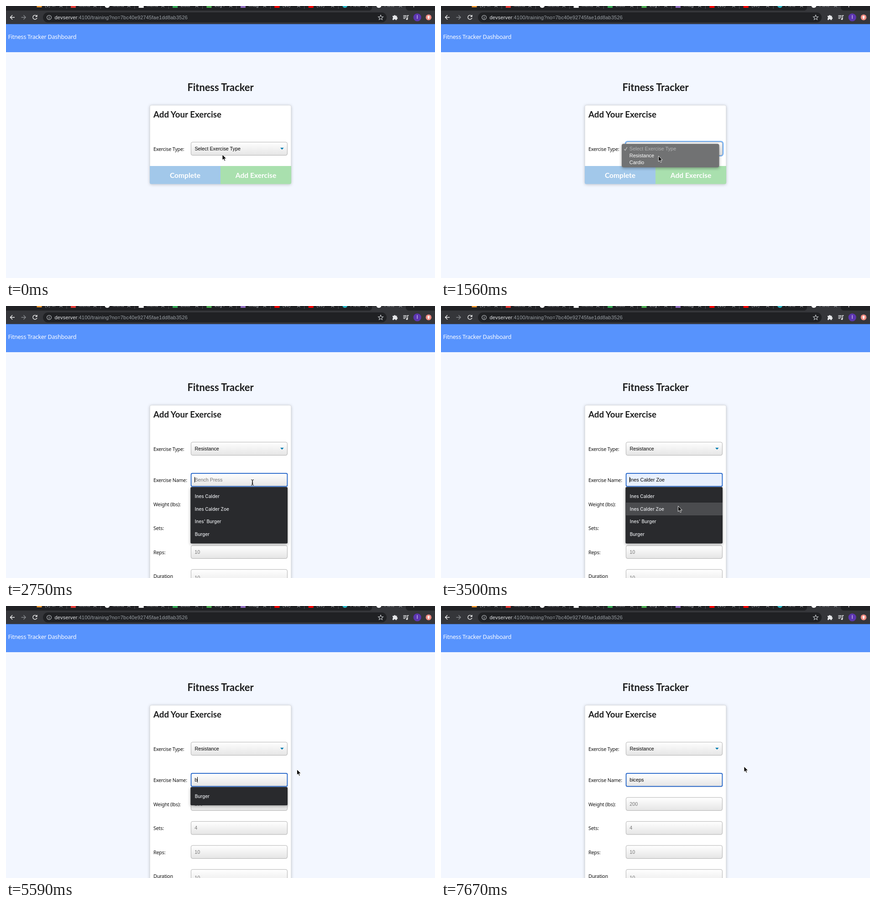
Animation of 940 by 595 pixels, one loop 8000 ms. Source, as an HTML page:

```html
<!DOCTYPE html>
<html lang="en">
<head>
<meta charset="utf-8">
<title>Fitness Tracker</title>
<style>
  html, body { margin: 0; width: 100%; height: 100%; overflow: hidden; background: #f3f7ff; }
  svg { display: block; width: 940px; height: 595px; }
  text { white-space: pre; }
  .head { font-family: Lato, sans-serif; font-weight: 700; fill: #1b1c1d; }
  .label { font: 10.8px "Noto Sans", sans-serif; letter-spacing: -.24px; fill: #111; }
  .field { font: 10.8px "Liberation Sans", Arial, sans-serif; fill: #000; }
  .hint { fill: #757575; }
  .menu { font: 11px "Liberation Sans", Arial, sans-serif; fill: #fff; }
  .option { font: 500 10px Inter, sans-serif; fill: #e8eaed; }
  .tab { font: 10px "Liberation Sans", Arial, sans-serif; fill: #a4a8ad; }
  .url { font: 11px "Liberation Sans", Arial, sans-serif; letter-spacing: .17px; fill: #9aa0a6; }
  .line { fill: none; stroke-width: 1.4; }
  .soft { filter: drop-shadow(0 1px 3px rgba(0, 0, 0, .2)); }
  .deep { filter: drop-shadow(0 2px 3px rgba(0, 0, 0, .35)); }
</style>
</head>
<body>
<svg id="stage" viewBox="0 0 940 595">
  <defs>
    <linearGradient id="sheen" x2="0" y2="1">
      <stop stop-color="#fff"/><stop offset="1" stop-color="#e5e5e5"/>
    </linearGradient>
  </defs>
  <rect width="940" height="595" fill="#f3f7ff"/>
  <g id="browser"></g>
  <rect y="39.5" width="940" height="61.5" fill="#5793fd"/>
  <text x="4.5" y="72" fill="#fff" style="font:12.6px 'Noto Sans',sans-serif;letter-spacing:-.27px">Fitness Tracker Dashboard</text>
  <text class="head" x="470" y="185.5" font-size="21.84" text-anchor="middle">Fitness Tracker</text>

  <rect id="card" class="soft" x="315.2" y="217" width="309.6" height="172.5" rx="3.5" fill="#fff" stroke="#d0d3d8" stroke-width=".8"/>
  <text class="head" x="323" y="243.5" font-size="18.72">Add Your Exercise</text>

  <g id="buttons">
    <path d="M315 350h155v39.5H318.5a3.5 3.5 0 0 1-3.5-3.5z" fill="#a2c8ea"/>
    <path d="M470 350h155v36a3.5 3.5 0 0 1-3.5 3.5H470z" fill="#a9e0ae"/>
    <text class="head" x="392.5" y="376.3" font-size="15.6" text-anchor="middle" style="fill:#fff">Complete</text>
    <text class="head" x="547.5" y="376.3" font-size="15.6" text-anchor="middle" style="fill:#fff">Add Exercise</text>
  </g>
  <g id="form"></g>

  <text class="label" x="323" y="317">Exercise Type:</text>
  <rect id="ring" x="404" y="296.3" width="214" height="31.4" rx="5" fill="none" stroke="#76b3f8" stroke-width="2.6"/>
  <rect x="405.4" y="297.8" width="211" height="28.8" rx="3.5" fill="url(#sheen)" stroke="#aaa" stroke-width=".9"/>
  <text id="choice" class="field" x="413.4" y="316.2"></text>
  <path d="M601 310h7.6l-3.8 4.2z" fill="#007cb2"/>

  <g id="popup">
    <rect class="deep" x="396" y="301.5" width="213.5" height="51.5" rx="4" fill="#717273"/>
    <rect id="pick" x="396" y="319.7" width="213.5" height="15.2" fill="#3c95fd"/>
    <path class="line" d="M401.5 313l2.2 2.8 4-7" stroke="#bbb" stroke-width="1"/>
    <text class="menu" x="412.8" y="316.2" style="fill:#b4b5b6">Select Exercise Type</text>
    <text class="menu" x="412.8" y="331">Resistance</text>
    <text class="menu" x="412.8" y="345.7">Cardio</text>
  </g>

  <g id="list">
    <rect id="panel" class="deep" x="404.3" y="396" width="212.7" height="123.5" rx="2.5" fill="#292a2d"/>
    <rect id="hover" x="404.3" width="212.7" height="28" fill="#4b4c4f"/>
    <g id="options"></g>
  </g>

  <path id="arrow" d="M0 0v12.2l2.8-2.6 2 4.5 2-.9-2-4.3h3.9z" fill="#000" stroke="#fff" stroke-width=".9"/>
  <path id="beam" class="line" d="M-3-6q3 0 3 1.5V4.5q0 1.5-3 1.5M3-6q-3 0-3 1.5V4.5q0 1.5 3 1.5M-1.5 2h3" stroke="#000" style="stroke-width:1"/>
</svg>
<script>
const LOOP = 8000;
const $ = id => document.getElementById(id);
const show = (id, on) => $(id).style.display = on ? '' : 'none';
const label = (cls, x, y, text, extra = '') => `<text class="${cls}" x="${x}" y="${y}" ${extra}>${text}</text>`;

function browser() {
  const colors = ['#e8952f', '#e53935', '#fff', '#fff', '#34a853', '#4caf50', '#8e6bbf', '#f00', '#f00', '#26b5c4', '#fff'];
  const titles = ['(1) M', 'Menu', 'Menu', 'menu', 'Lists', 'Log i', 'Imag', '(10)', '(10)', 'Fitne', 'Fitne'];
  let out = '<rect width="940" height="40" fill="#202124"/>' +
    '<path d="M794 10.5q8-1 8-7V0h74v3.5q0 6 8 7z" fill="#35363a"/>' +
    '<rect y="10" width="940" height="29" fill="#35363a"/>' +
    '<rect x="81" y="14" width="753" height="22" rx="11" fill="#202124"/>';
  titles.forEach((title, i) => {
    const x = i * 74.4;
    const round = [2, 9, 10].includes(i);
    out += round
      ? `<circle cx="${x + 73}" cy="-1.5" r="5.6" fill="${colors[i]}"/>`
      : `<rect x="${x + 67.5}" y="-7" width="11" height="${i ? 11 : 10}" fill="${colors[i]}"/>`;
    out += label('tab', x + 85, 2.2, title) +
      `<path class="line" d="M${x + 117.5} 2.5l6-6m0 6l-6-6" stroke="#a4a8ad" style="stroke-width:1.1"/>`;
    if (i < 9) out += `<path d="M${x + 133} 0v6" stroke="#55585d"/>`;
  });
  return out + `
    <path d="M893.5 0v3" stroke="#ccc" stroke-width="1.4"/>
    <path class="line" d="M19 24.7H9.5m4.6-4.7l-4.7 4.7 4.7 4.7" stroke="#eee"/>
    <path class="line" d="M33.5 24.7H43m-4.6-4.7l4.7 4.7-4.7 4.7" stroke="#84878b"/>
    <path class="line" d="M67 21.7a4.6 4.6 0 1 0 .9 4.3" stroke="#eee"/>
    <path d="M68.6 19v4.8h-4.8z" fill="#eee"/>
    <circle class="line" cx="94.5" cy="25" r="4.8" stroke="#c4c7cb" style="stroke-width:1.1"/>
    <path d="M94.5 24.2v3.5m0-5.6v1.1" stroke="#c4c7cb" stroke-width="1.2"/>
    <text class="url" x="106.5" y="28.6"><tspan fill="#e8eaed">devserver</tspan>:4100/training?no=7bc40e92745fae1dd8ab3526</text>
    <path class="line" d="M821 19.7l1.5 3.6 3.9.3-3 2.5 1 3.8-3.4-2-3.4 2 1-3.8-3-2.5 3.9-.3z" stroke="#c4c7cb" style="stroke-width:1.1"/>
    <path d="M847 21.5h3a1.8 1.8 0 0 1 3.6 0h3v3.2a1.7 1.7 0 0 1 0 3.4v2.4h-3.3a1.7 1.7 0 0 0-3.4 0H847v-3.2a1.7 1.7 0 0 0 0-3.2z" fill="#e6e7e9"/>
    <path class="line" d="M870.5 21.2h7.5m-7.5 3h7.5m-7.5 3h4.5m4.8 1.5v-8h2.6" stroke="#e6e7e9"/>
    <circle cx="878.5" cy="28.5" r="1.9" fill="#e6e7e9"/>
    <circle cx="901.2" cy="24.8" r="8.6" fill="#5c35b0"/>
    <text x="901.2" y="28.3" fill="#fff" text-anchor="middle" style="font:10px Roboto,sans-serif">I</text>
    <circle cx="926" cy="24.8" r="6.4" fill="#ee8a80"/>
    <path d="M926 20.8l3.4 3.8h-2v3.6h-2.8v-3.6h-2z" fill="#fff"/>`;
}

function form() {
  const rows = [['Exercise Name:', ''], ['Weight (lbs):', '200'], ['Sets:', '4'], ['Reps:', '10'], ['Duration', '10']];
  const out = rows.map(([name, hint], i) => {
    const top = 366 + i * 52.5;
    const tall = i === 4;
    return label('label', 323, top + 19.2, name) +
      `<rect x="405.4" y="${top + .3}" width="211" height="${tall ? 36 : 28.6}" rx="3.5" fill="url(#sheen)" stroke="#aaa" stroke-width=".9"/>` +
      label('field hint', 413.2, top + (tall ? 22 : 18.4), hint);
  }).join('');
  return out +
    '<rect id="focus" x="405.6" y="366.2" width="210.8" height="28.4" rx="2.5" stroke="#1a5fc8" stroke-width="1.7"/>' +
    label('field', 413.2, 384.2, '', 'id="name"') +
    '<rect id="caret" y="374" width="1" height="12" fill="#000"/>';
}

$('browser').innerHTML = browser();
$('form').innerHTML = form();

const people = ['Ines Calder', 'Ines Calder Zoe', "Ines' Burger", 'Burger'];

// Each track is a list of [start ms, value] steps.
const tracks = {
  popup: [[0, false], [170, true], [1710, false]],
  pick: [[0, false], [670, true], [1560, false], [1640, true]],
  choice: [[0, 'Select Exercise Type'], [1710, 'Resistance']],
  form: [[0, false], [1860, true]],
  ring: [[0, false], [170, true], [2600, false]],
  focus: [[0, false], [2600, true]],
  list: [[0, 0], [2750, 4], [5590, 1], [5880, 0]],
  hover: [[0, -1], [3050, 0], [3200, 1], [3650, 0], [3800, -1]],
  typed: [[0, ''], [5590, 'b'], [5740, 'bi'], [6030, 'bic'], [6180, 'bice'], [6330, 'bicep'], [7230, 'biceps']],
  caret: [[0, false], [2600, true], [3050, false], [3500, true], [3940, false], [4390, true],
    [4840, false], [5290, true], [6780, false], [7230, true], [7670, false]],
  mouse: [[0, [474, 325]], [380, [474, 326]], [670, [475, 327]], [960, [476.5, 328]],
    [2160, [490, 345]], [2310, [518, 366]], [2460, [540, 386]], [2900, [540, 390]],
    [3050, [536, 408]], [3200, [526, 432]], [3350, [521, 436]], [3500, [519.5, 437.5]],
    [3650, [548, 418]], [3800, [596, 380]], [3940, [628, 362]], [4090, [637.5, 357.5]],
    [7530, [652, 354]], [7670, [664, 351]]]
};

function at(track, t) {
  let value;
  for (const [start, next] of tracks[track]) if (start <= t) value = next;
  return value;
}

let drawnList = -1;
function drawList(count) {
  if (count === drawnList) return;
  drawnList = count;
  const items = people.slice(people.length - count);
  $('options').innerHTML = items.map((item, i) => label('option', 413.7, 419.6 + i * 27.9, item)).join('');
  $('panel').setAttribute('height', 12 + count * 27.9);
}

function render(t) {
  for (const id of ['popup', 'pick', 'form', 'ring', 'focus', 'caret']) show(id, at(id, t));
  const open = at('form', t);
  show('buttons', !open);
  $('card').setAttribute('height', open ? 450 : 172.5);
  $('choice').textContent = at('choice', t);

  const count = at('list', t);
  const hover = at('hover', t);
  const typed = at('typed', t);
  show('list', count);
  show('hover', hover >= 0);
  $('hover').setAttribute('y', 402 + hover * 28);
  drawList(count);

  const name = $('name');
  name.textContent = typed || people[hover] || 'Bench Press';
  name.classList.toggle('hint', !typed && hover < 0);
  $('focus').setAttribute('fill', hover >= 0 ? '#e8f0fe' : 'url(#sheen)');
  const caretX = typed ? 413.2 + name.getComputedTextLength() : 413;
  $('caret').setAttribute('x', Math.round(caretX));

  const [x, y] = at('mouse', t);
  const beam = t >= 2460 && t < 3050;
  show('beam', beam);
  show('arrow', !beam);
  $(beam ? 'beam' : 'arrow').setAttribute('transform', `translate(${x} ${y})`);
}

const begin = performance.now();
function tick() {
  render((performance.now() - begin) % LOOP);
  requestAnimationFrame(tick);
}
tick();
</script>
</body>
</html>
```
